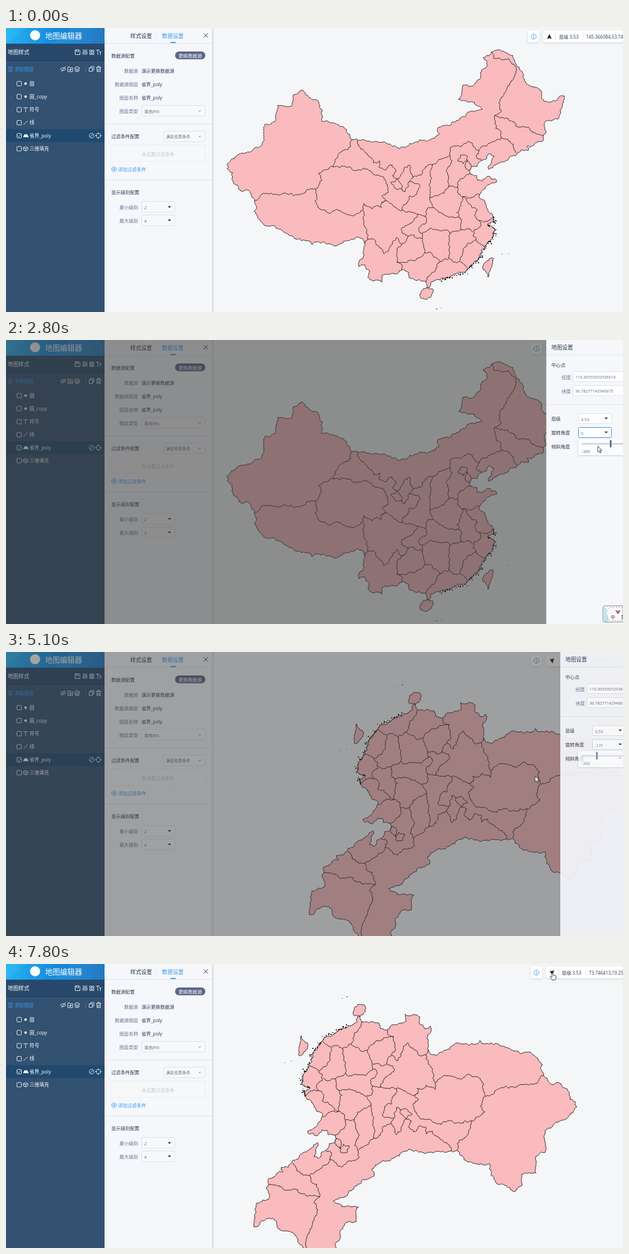
An HTML page that plays this animation: 1102x508 px, repeating every 8 s.

```html
<!DOCTYPE html>
<html lang="zh">
<head>
<meta charset="utf-8">
<title>地图编辑器</title>
<style>
html,body{margin:0;width:100%;height:100%;overflow:hidden;background:#f4f6f8}
svg{display:block;width:1102px;height:508px}
text{font:8.4px "Open Sans","Noto Sans CJK SC","Noto Sans CJK",sans-serif;dominant-baseline:central;fill:#2d3a4f}
.big{font-size:9.7px}
.white text,text.white{fill:#fff}
.blue{fill:#3a9bee}
.label{text-anchor:end;fill:#66738f}
.small{font-size:7.2px;fill:#606a78}
.field{fill:#f6f8fa;stroke:#dde1e8}
.icon{fill:none;stroke:#e4edf6;stroke-width:1}
#borders polyline,#coast,.isle{fill:none;stroke:#1c1718;stroke-width:.9;stroke-linejoin:round;shape-rendering:crispEdges}
#coast,.isle{fill:#f9bbbd}
.points{display:none}
</style>
</head>
<body>
<svg viewBox="0 0 1102 508">
<defs>
  <linearGradient id="sky"><stop stop-color="#25b3f3"/><stop offset=".45" stop-color="#178ddf"/><stop offset="1" stop-color="#1966b3"/></linearGradient>
  <linearGradient id="edge"><stop stop-color="#d3d8dd"/><stop offset="1" stop-color="#d3d8dd" stop-opacity="0"/></linearGradient>
  <pattern id="dots" width="5" height="5" patternUnits="userSpaceOnUse"><circle cx="2" cy="2" r=".8" fill="#6db9ee" opacity=".45"/></pattern>
  <filter id="lift" x="-20%" y="-30%" width="140%" height="170%"><feDropShadow dx="0" dy="1" stdDeviation="1.5" flood-color="#6d7c90" flood-opacity=".35"/></filter>
  <clipPath id="land"><path id="landClip"/></clipPath>
  <path id="caret" d="M-3-1.3h6L0 1.7z" fill="#222"/>
  <path id="chevron" d="M-2-1 0 1 2-1" fill="none" stroke="#69727f" stroke-width=".9"/>
  <rect id="box" x="19.5" y="-4" width="8" height="8" rx="1" class="icon"/>
</defs>

<rect width="1102" height="508" fill="#f4f6f8"/>
<g id="map">
  <path id="coast"/>
  <g id="borders" clip-path="url(#land)">
    <polyline points="618,200 616,212 604,219 588,235 584,248 566,255 558,260 564,272 553,288 552,309 557,321 574,330 597,326 609,334 625,333 637,325"/>
    <polyline points="444,309 457,297 478,298 500,296 521,298 540,289 553,288"/>
    <polyline points="584,248 605,247 624,255 639,250 654,259 669,265 682,284 683,294 672,301 677,309 671,312 671,321 660,319 654,324 639,314 637,325"/>
    <polyline points="628,201 634,217 648,230 656,241 668,238 666,249 678,254 690,245 697,256 690,264 698,270"/>
    <polyline points="698,270 711,250 721,245 723,260 727,266 720,275 717,285 713,293 707,288 705,278 698,270"/>
    <polyline points="698,270 687,276 694,286 707,288"/>
    <polyline points="727,266 741,263 749,248 763,244 758,263 758,275 756,304"/>
    <polyline points="720,275 739,281 733,298 721,300 718,309 709,319 708,326"/>
    <polyline points="671,312 679,309 686,314 696,320 708,326 723,329 736,333 749,338 752,324 763,321"/>
    <polyline points="763,244 773,235 793,228 793,216 802,211 812,212 827,203 834,211 845,220 852,211 867,204 877,200 886,197 885,187 875,180 874,167 873,156"/>
    <polyline points="873,156 885,148 880,134 888,122 893,113 905,93 911,80 908,66 898,55 885,57 871,54 867,43"/>
    <polyline points="873,156 883,161 897,162 909,170 915,178 930,178 946,188 962,191"/>
    <polyline points="886,197 896,199 906,208 912,223"/>
    <polyline points="845,220 840,229 850,237"/>
    <polyline points="807,238 812,227 824,229 824,238 817,243 807,238"/>
    <polyline points="824,235 830,243 832,249 827,255 820,247 824,237"/>
    <polyline points="793,228 797,237 789,250 789,263 789,275 790,284 783,295 771,300 757,304 761,315 763,321 778,331 793,338 810,339"/>
    <polyline points="790,284 806,285 809,273 820,265 832,262"/>
    <polyline points="806,285 806,294 816,302 830,304 846,298"/>
    <polyline points="816,302 812,313 810,322 805,330 810,339 813,349 814,361 824,359 834,365"/>
    <polyline points="816,302 826,313 834,322 842,326 837,335 845,345 854,347 865,343 870,338"/>
    <polyline points="845,345 847,354 836,361 834,372 839,379 847,386 856,390"/>
    <polyline points="736,333 728,345 716,353 706,359 709,368 718,373 728,370 737,376 743,377 744,367 737,360 751,348 749,338"/>
    <polyline points="744,367 758,358 773,362 788,361 793,368 802,364 814,361"/>
    <polyline points="793,368 790,386 793,402 791,410 782,414 775,418 766,410 758,401 748,402 746,390 743,377"/>
    <polyline points="748,402 734,412 718,416 698,419 698,409 698,395 706,387 712,384 718,373"/>
    <polyline points="706,387 697,375 690,387 683,399 674,403 667,393 660,384 653,377 646,378 641,386"/>
    <polyline points="637,325 640,347 644,364 646,378"/>
    <polyline points="698,419 708,426 707,434"/>
    <polyline points="775,418 770,427 767,432 759,440 752,450 750,454"/>
    <polyline points="791,410 799,419 810,417 820,424 824,430"/>
    <polyline points="811,416 816,401 824,386 839,379"/>
  </g>
  <g class="points" id="outline">
    <polyline points="867,43 888,41 905,49 911,65 921,77 926,93 938,104 946,106 956,113 961,131 976,131 986,125 998,122 996,132 990,147 986,163 970,165 961,171 964,184 961,197 957,203 948,205 931,211 933,219 921,217 914,224 905,229 896,236"/>
    <polyline points="887,240 875,245 862,253 867,240 872,229 864,225 857,235 848,238 841,248 830,249 828,255 832,262 841,264 842,272 850,274 860,265 874,270 876,276 862,280 855,288 846,298 845,302 855,311 861,325 870,337 871,347 860,352 871,358 870,368 868,377 860,383 854,395 848,403 845,411 835,420 825,430 817,437 802,440 795,444 788,446 773,450 758,455 757,464 751,464 750,453 738,450"/>
    <polyline points="733,452 720,447 719,437 706,433 693,440 678,440 671,443 672,455 665,451 656,453 646,446 649,436 641,424 630,427 631,417 640,406 641,387 633,376 628,373 616,378 603,381 590,390 575,386 556,383 547,388 544,382 528,381 516,377 497,366 478,353 466,354 453,343 443,328"/>
    <polyline points="448,322 444,309 436,294 416,289 406,275 405,259 395,252 395,243 411,230 424,224 440,219 457,208 461,195 462,173 480,168 485,138 510,140 513,120 528,111 535,119 555,129 565,148 564,167 589,171 608,181 618,200 649,203 672,204 703,216 728,206 757,200 773,191 771,179 789,174 810,164 827,150 850,146 837,133 822,130 808,128 816,102 830,104 845,92 847,80 859,65 852,53"/>
  </g>
  <polygon class="isle" points="739,478 741,471 752,465 762,467 763,471 756,482 747,485 740,482"/>
  <polygon class="isle" points="868,411 871,413 866,430 861,446 852,432 856,420"/>
  <path id="specks" fill="#1c1718" shape-rendering="crispEdges"/>
</g>

<g id="status">
  <rect x="937" y="4.500" width="21" height="21" rx="3" fill="#fff" filter="url(#lift)"/>
  <circle cx="947.500" cy="15.500" r="4.500" fill="none" stroke="#3a9bee"/>
  <path d="M947.500 14.500v4M947.500 12v1.200" stroke="#3a9bee"/>
  <rect x="964" y="4.500" width="185" height="21" rx="3" fill="#fff" filter="url(#lift)"/>
  <path id="compass" d="M0-5 4 4 0 2.500-4 4z" fill="#15191f"/>
  <path d="M986.500 8v14M1035.500 8v14" stroke="#e3e6ea"/>
  <text x="993" y="15.500" style="font-size:8.200px">层级 3.53</text>
  <text id="coords" x="1041" y="15.500" style="font-size:8.100px"></text>
</g>

<rect width="176" height="508" fill="#335171"/>
<rect width="176" height="28" fill="url(#sky)"/>
<path d="M0 28 34 0H0zM84 28 118 0H176V28z" fill="#55caff" opacity=".16"/>
<rect x="112" width="64" height="28" fill="url(#dots)"/>
<circle cx="52" cy="13" r="9" fill="#fff"/>
<rect y="28" width="176" height="30" fill="#28496b"/>
<path d="M0 58.500H176" stroke="#203c5a"/>
<rect y="181" width="176" height="23" fill="#20496f"/>
<g class="white">
  <text x="70" y="13.500" style="font-size:13.200px">地图编辑器</text>
  <text class="big" x="3" y="43.500">地图样式</text>
  <g id="layers"></g>
</g>
<g class="icon">
  <path d="M123.500 39h7l1.500 1.500v7h-8.500zM125.500 39v3h4v-3M138 38.500v9.500M141 38.500v9.500M144 38.500v9.500M136.500 45h3M139.500 41h3M142.500 44h3M149.500 39.500h3v3h-3zM154 39.500h3v3h-3zM149.500 44.500h3v3h-3zM154 44.500h3v3h-3zM161 39.500h6M164 39.500v8.500M166.500 42.500h4M168.500 42.500v5.500"/>
  <path d="M97 73.500q5-5 10 0q-5 5-10 0M99 78l7-9M110.500 69.500h3l1 1.500h4.500v7h-8.500zM112.500 74.500h5M115 72v5M127 69l5 2.500-5 2.500-5-2.500zM122.500 74l4.500 2.500 4.500-2.500M122.500 76l4.500 2.500 4.500-2.500M148.500 71.500h6v6h-6zM151 71v-2h6v6h-2.500M161 70.500h9M164 70v-1.500h3V70M162.500 71v7h6v-7M164.500 73v3.500M166.500 73v3.500"/>
  <path d="M142.500 69v9" stroke="#58728e"/>
  <circle cx="153" cy="192.500" r="4.200"/><path d="m150.500 195 5-5"/>
  <circle cx="165" cy="192.500" r="4.200"/><path d="M165 187v3m0 5v3M159.500 192.500h3m5 0h3"/>
</g>
<path d="M8 69l4 2-4 2-4-2zM4 74l4 2 4-2M4 76.500l4 2 4-2" fill="none" stroke="#3a9bee"/>
<text class="blue" x="15" y="74" style="font-size:8.600px">添加图层</text>

<rect x="176" width="192" height="508" fill="#f5f7fb"/>
<rect x="368" width="4" height="508" fill="url(#edge)"/>
<path d="M176 27.500H368M176 171.500H368M176 271.500H368" stroke="#dfe3e9"/>
<text class="big" x="222" y="14">样式设置</text>
<text class="big blue" x="278.500" y="14">数据设置</text>
<rect x="294" y="25" width="9" height="2" fill="#3a9bee"/>
<path d="m353 9.500 7.500 7.500m0-7.500-7.500 7.500" stroke="#222b38"/>
<text x="188" y="49">数据源配置</text>
<rect x="302" y="42" width="54" height="14" rx="7" fill="#5b658a"/>
<text class="white" x="308" y="49">更换数据源</text>
<text class="label" x="236" y="76">数据源</text><text x="242" y="76">演示更换数据源</text>
<text class="label" x="236" y="100">数据源图层</text><text x="242" y="100">省界_poly</text>
<text class="label" x="236" y="124">图层名称</text><text x="242" y="124">省界_poly</text>
<text class="label" x="236" y="148">图层类型</text>
<rect class="field" x="242.500" y="138.500" width="113" height="19" rx="2"/>
<text class="small" x="247" y="148.500">填充(fill)</text><use href="#chevron" x="346" y="148.500"/>
<text x="188" y="193.500">过滤条件配置</text>
<rect class="field" x="281.500" y="184.500" width="74" height="19" rx="2"/>
<text class="small" x="286" y="194">满足任意条件</text><use href="#chevron" x="346" y="194"/>
<rect class="field" x="188.500" y="209.500" width="167" height="29" stroke-dasharray="2 2"/>
<text x="271.500" y="225" text-anchor="middle" style="fill:#c3c8d0">未设置过滤条件</text>
<path d="M197.200 252.500a4.200 4.200 0 1 0-8.400 0a4.200 4.200 0 1 0 8.400 0M190.500 252.500h5M193 250v5" fill="none" stroke="#3a9bee"/>
<text class="blue" x="200" y="252.500">添加过滤条件</text>
<text x="188" y="293">显示级别配置</text>
<text class="label" x="236" y="320">最小级别</text>
<rect class="field" x="242.500" y="310.500" width="59" height="19" rx="2"/><text class="small" x="247" y="321">2</text><use href="#caret" x="292" y="320"/>
<text class="label" x="236" y="344">最大级别</text>
<rect class="field" x="242.500" y="334.500" width="59" height="19" rx="2"/><text class="small" x="247" y="345">4</text><use href="#caret" x="292" y="344"/>

<rect id="mask" width="1102" height="508" fill="#373737"/>

<g id="drawer">
  <rect x="965" width="200" height="508" fill="#f5f7fb"/>
  <path d="M965 26.500h200M965 115.500h200" stroke="#e2e6ec"/>
  <text class="big" x="974" y="13.500">地图设置</text>
  <text x="974" y="44">中心点</text>
  <text class="label" x="1009" y="66">经度</text><text class="label" x="1009" y="91">纬度</text>
  <g fill="#fff" stroke="#dde1e8">
    <rect x="1012.500" y="56.500" width="140" height="18" rx="2"/><rect x="1012.500" y="81.500" width="140" height="18" rx="2"/>
    <rect x="1022.500" y="131.500" width="59" height="18" rx="2"/><rect x="1022.500" y="181.500" width="59" height="18" rx="2"/>
    <rect id="angleBox" x="1022.500" y="156.500" width="59" height="18" rx="2"/>
  </g>
  <text class="small" x="1017" y="66">110.30550052936019</text>
  <text class="small" x="1017" y="91">36.78277142946675</text>
  <text x="974" y="140.500">层级</text><text class="small" x="1027" y="141.500">3.53</text><use href="#caret" x="1072" y="140"/>
  <text x="974" y="165.500">旋转角度</text><text id="angle" class="small" x="1027" y="166.500"></text><use href="#caret" x="1072" y="165"/>
  <path id="beam" d="M1043.500 162v9" stroke="#222"/>
  <text x="974" y="190.500">倾斜角度</text><text class="small" x="1027" y="191">0</text><use href="#caret" x="1072" y="190"/>
</g>
<g id="slider">
  <rect x="1022" y="177" width="125" height="29" rx="2" fill="#fbfcfe" filter="url(#lift)"/>
  <rect x="1028" y="184" width="104" height="3.500" rx="1.500" fill="#d6daea"/>
  <rect id="knob" y="179" width="3" height="13" rx="1" fill="#5b658a"/>
  <text class="small" x="1028.500" y="198.500">-360</text>
</g>
<g id="ime">
  <path d="M1102 475.500H1070q-4 0-4 4v21q0 4 4 4h32z" fill="#fdf9f8" stroke="#6f8790"/>
  <path d="M1066.500 478q9 0 5 10q5 8 4 16h-6q-3 0-3-4z" fill="#bfe5ee"/>
  <path d="M1102 478.500H1078l-6 8 4 15h26" fill="none" stroke="#d99a98" stroke-dasharray="3 2"/>
  <path d="m1089 483 3 1.500h2l3-1.500v3l-2 .5v3h-4v-3l-2-.5z" fill="#a85d68"/>
  <text x="1080" y="495.500" style="font-size:8px">中</text><text x="1098.500" y="495.500" style="font-size:8px">简</text>
</g>
<g id="cursor" fill="#fff" stroke="#111" stroke-width=".8" stroke-linejoin="round">
  <path id="arrow" d="M0 0V10.500L2.400 8.300 4 12 5.700 11.300 4.200 7.700H7.500z"/>
  <path id="hand" d="M-1 1Q0-.5 1 1V5Q2 4 3 5.300Q4 4.500 5 5.800Q6.500 5.500 6.500 7V9.500L5 13.500H-.5L-4 8.500Q-4.500 6.500-2.500 7L-1 8.500z"/>
</g>
</svg>
<script>
const $ = id => document.getElementById(id);
const set = (id, name, value) => $(id).setAttribute(name, value);
const CENTER = {x: 756, y: 278, lon: 110.3055, lat: 36.78277, scale: 9.915};
const RAD = Math.PI / 180;

// Layer list
const glyphs = [
  '<circle cx="35" r="2.2" fill="#fff"/>', '<circle cx="35" r="2.2" fill="#fff"/>',
  '<path class="icon" d="M31-3.500h8M35-3.500v8"/>', '<path class="icon" d="m31.500 3.500 7-7"/>',
  '<path d="M33-2.500h5l2.500 5h-10z" fill="#fff"/>',
  '<path class="icon" d="m35-4 4 2v4l-4 2-4-2v-4zM31-2l4 2 4-2M35 0v4"/>'];
$('layers').innerHTML = ['圆', '圆_copy', '符号', '线', '省界_poly', '三维填充'].map((name, i) =>
  `<g transform="translate(0 ${99.5 + i * 23.3})"><use href="#box"/>${glyphs[i]}` +
  (i === 4 ? '<path class="icon" d="m21 0 2 2 3.500-4"/>' : '') +
  `<text x="42" style="font-size:8.700px">${name}</text></g>`).join('');

// Ragged borders: seeded midpoint displacement between a few points
let seed = 71;
const random = () => (seed = seed * 16807 % 2147483647) / 2147483647;
const pointsOf = el => el.getAttribute('points').split(' ').map(p => p.split(',').map(Number));
function split(a, b, out) {
  const dx = b[0] - a[0], dy = b[1] - a[1], len = Math.hypot(dx, dy);
  if (len > 2.4) {
    const k = (random() - .5) * Math.min(.5, 5 / len);
    const mid = [(a[0] + b[0]) / 2 - dy * k, (a[1] + b[1]) / 2 + dx * k];
    split(a, mid, out);
    split(mid, b, out);
  } else out.push(b.map(v => v.toFixed(1)));
}
function rough(points) {
  const out = [points[0]];
  for (let i = 1; i < points.length; i++) split(points[i - 1], points[i], out);
  return out.join(' ');
}
const sections = [...$('outline').children].map(pointsOf);
const ring = sections.flat();
const landPath = 'M' + rough([...ring, ring[0]]) + 'Z';
set('coast', 'd', landPath);
set('landClip', 'd', landPath);
document.querySelectorAll('#borders polyline').forEach(el => el.setAttribute('points', rough(pointsOf(el))));
document.querySelectorAll('.isle').forEach(el => {
  const p = pointsOf(el);
  el.setAttribute('points', rough([...p, p[0]]));
});

// Small islands along the southeast coast
const speck = (x, y, w = 1, h = 1) => `M${x.toFixed(1)} ${y.toFixed(1)}h${w}v${h}h-${w}z`;
const shore = sections[1].slice(24, 41);
let specks = speck(885, 404) + speck(897, 403) + speck(768, 502, 2) + speck(777, 500);
for (let i = 0; i < 130; i++) {
  const n = Math.floor(random() * (shore.length - 1)), f = random(), [a, b] = [shore[n], shore[n + 1]];
  const off = random() * random() * 7;
  specks += speck(a[0] + (b[0] - a[0]) * f + off - 1, a[1] + (b[1] - a[1]) * f + off * .5 - .5,
    1 + Math.round(random()), 1 + Math.round(random()));
}
set('specks', 'd', specks);

// Keyframes: [time, value, ...], linear in between
function track(keys, t) {
  const i = keys.findIndex(k => k[0] > t);
  if (i < 0) return keys[keys.length - 1].slice(1);
  if (!i) return keys[0].slice(1);
  const [a, b] = [keys[i - 1], keys[i]], f = (t - a[0]) / (b[0] - a[0]);
  return a.slice(1).map((v, j) => v + (b[j + 1] - v) * f);
}
const pointer = [[0, 1106, 36], [100, 1072, 35], [500, 560, 38], [800, 190, 43], [900, 143, 45], [1000, 146, 46],
  [1200, 146, 46], [1600, 700, 110], [2000, 1045, 158], [2300, 1050, 166], [2600, 1064, 174], [2800, 1057, 190],
  [2900, 1057, 190], [3300, 1080, 182], [3400, 1080, 182], [3800, 1057, 179], [4000, 1057, 179], [4200, 1055, 179],
  [4400, 1055, 179], [4800, 945, 222], [5300, 945, 222], [5800, 1000, 103], [6000, 976, 15], [6100, 976, 15],
  [6300, 1000, 180], [6900, 901, 180], [7100, 901, 180], [7700, 976, 15]];
const shade = [[1100, 0], [1200, .14], [1300, .34], [1400, .5], [1500, .55], [4900, .55], [5000, .53],
  [5100, .45], [5200, .2], [5300, .03], [5400, 0]];
const slide = [[1200, 180], [1300, 125], [1400, 52], [1500, 12], [1600, 0], [4900, 0], [5000, 4], [5100, 25], [5200, 95], [5300, 180]];
const drawerFade = [[5000, 1], [5100, .92], [5300, .3]];
const sliderFade = [[2400, 0], [2600, 1], [4900, 1], [5000, .95], [5100, .75], [5200, .3], [5300, .06], [5400, 0]];
const bearing = [[3400, 0], [3500, -30], [3600, -78], [3700, -125], [3800, -159], [4000, -159], [4100, -166], [4200, -171]];
const pan = [[6250, 0], [6900, -98], [7100, -99]];

function position(t, x, y, turn, shift) {
  if (t < 100) return '145.366084,53.741208';
  if (t >= 7700) return '73.746413,19.253107';
  if (t <= 5300 && x < 371 || t >= 1000 && t <= 5300) return '71.531904,53.726415';
  const dx = x - shift - CENTER.x, dy = y - CENTER.y, c = Math.cos(turn * RAD), s = Math.sin(turn * RAD);
  const lon = CENTER.lon + (c * dx + s * dy) / CENTER.scale;
  const mercator = Math.asinh(Math.tan(CENTER.lat * RAD)) - (c * dy - s * dx) / CENTER.scale * RAD;
  return `${lon.toFixed(6)},${(Math.atan(Math.sinh(mercator)) / RAD).toFixed(6)}`;
}

function draw(t) {
  const [x, y] = track(pointer, t), [angle] = track(bearing, t), [shift] = track(pan, t);
  set('map', 'transform', `translate(${shift}) rotate(${-angle} ${CENTER.x} ${CENTER.y})`);
  const place = position(t, x, y, -angle, shift);
  $('coords').textContent = place;
  set('status', 'transform', `translate(${parseFloat(place) >= 100 ? -5 : 0})`);
  set('compass', 'transform', `translate(975.500 15.500) rotate(${-angle})`);
  set('mask', 'opacity', track(shade, t));
  set('drawer', 'transform', `translate(${track(slide, t)})`);
  set('drawer', 'opacity', track(drawerFade, t));
  set('slider', 'opacity', track(sliderFade, t));
  set('knob', 'x', 1078.5 + angle * .1444);
  $('angle').textContent = Math.round(angle) || 0;
  set('angleBox', 'stroke', t >= 2300 && t < 5000 ? '#3f8fe8' : '#cbd6e6');
  set('beam', 'opacity', t >= 3800 && t < 5000 ? 1 : 0);
  set('ime', 'opacity', t >= 2300 && t < 5000 ? 1 : 0);
  set('cursor', 'transform', `translate(${x} ${y})`);
  const pointing = t === 900 || t >= 3200 && t < 4500 || t >= 6000 && t < 6200 || t >= 7600;
  set('hand', 'opacity', pointing ? 1 : 0);
  set('arrow', 'opacity', pointing ? 0 : 1);
}

const start = performance.now();
function tick() {
  draw(Math.floor((performance.now() - start) % 8000 / 100) * 100);
  requestAnimationFrame(tick);
}
tick();
</script>
</body>
</html>
```
